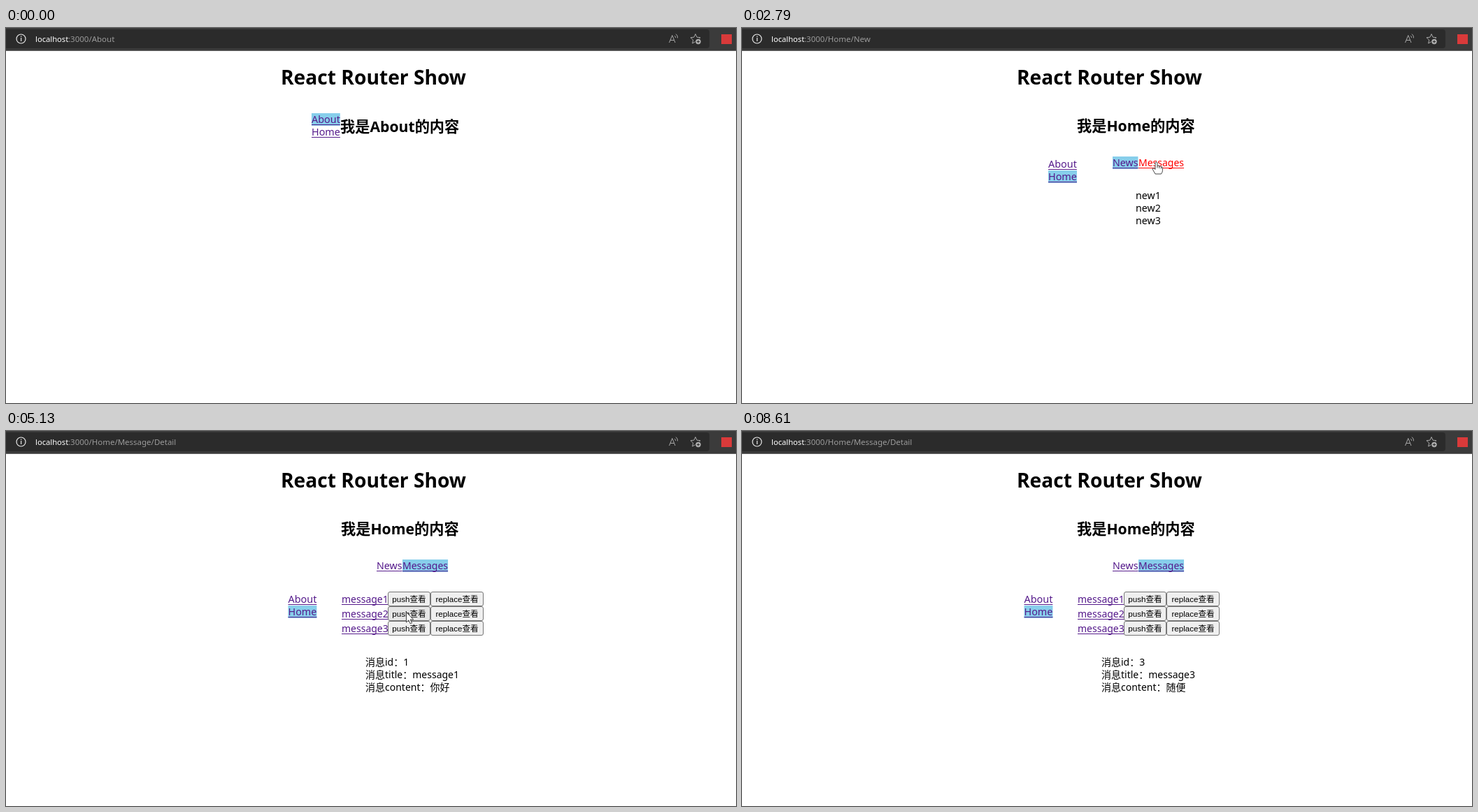
Recreate the animation shown at these times as an HTML page with a canvas. Size 1044x537 px, loop 9.34 s.

```html
<!DOCTYPE html>
<html lang="zh-CN">
<head>
<meta charset="utf-8">
<title>React Router Show</title>
<style>
html, body { margin: 0; width: 100%; height: 100%; overflow: hidden; background: #fff; }
canvas { display: block; }
</style>
</head>
<body>
<canvas id="stage" width="1044" height="537"></canvas>
<script>
const ctx = document.getElementById('stage').getContext('2d');
const LOOP = 9340, STEP = 70;
const SANS = '"Noto Sans", "Noto Sans CJK SC", "Noto Sans CJK", sans-serif';
const ARIAL = '"Liberation Sans", "Noto Sans CJK SC", "Noto Sans CJK", sans-serif';

// Mouse moves: start time, number of steps, end point
const START = [1000, 530];
const MOVES = [
  [250, 11, 490, 138], [1020, 3, 468, 146], [1230, 3, 456, 147],
  [1830, 10, 592, 191], [2930, 9, 545, 237], [3560, 3, 513, 237],
  [4290, 13, 572, 259], [6120, 8, 636, 283], [7000, 11, 680, 356],
  [7770, 13, 986, 545]
];
// Mouse button: press, end of the highlight, release
const CLICKS = [
  [1570, 1630, 1670], [2590, 2720, 2860], [3960, 4090, 4090],
  [5660, 5790, 5790], [6810, 6940, 6940]
];
const URLS = [[0, 'About'], [1710, 'Home/New'], [2860, 'Home/Message'], [4090, 'Home/Message/Detail']];
const DETAILS = [[0, ''], [4090, '你好', 514], [5790, '我不号', 513], [6940, '随便', 514]];

const ARROW = new Path2D('M0 0V14.5L3.3 11.4 5.6 16.4 8 15.4 5.7 10.5H10.2Z');
const HAND = new Path2D('M-1.5 8V1.5Q0-1 1.5 1.5V6Q3.5 4.8 4.3 6.6 6.2 5.6 7 7.4 9 6.8 9 9V12Q9 15 7 17.5H-1.5L-5.5 10.5Q-5 8.6-3 9.6L-1.5 11ZM1.5 6V9M4.3 6.6V9.5M7 7.4V10');

let mouse, pressed, overLink;

const latest = (list, t) => list.filter(item => item[0] <= t).pop();

function mouseAt(t) {
  let [x, y] = START;
  for (const [start, steps, endX, endY] of MOVES) {
    if (t < start) break;
    const p = Math.min(1, (Math.floor((t - start) / STEP) + 1) / steps);
    const e = p * p * (3 - 2 * p);
    x += (endX - x) * e;
    y += (endY - y) * e;
  }
  return { x, y };
}

const mouseIn = (x, y, w, h) =>
  mouse.x >= x && mouse.x < x + w && mouse.y >= y && mouse.y < y + h;

function text(str, x, y, size = 14, color = '#000', weight = 400, family = SANS) {
  ctx.font = `${weight} ${size}px ${family}`;
  ctx.fillStyle = color;
  ctx.fillText(str, x, y);
  return ctx.measureText(str).width;
}

function rect(x, y, w, h, color) {
  ctx.fillStyle = color;
  ctx.fillRect(x, y, w, h);
}

function link(str, x, base, active = false, size = 14) {
  ctx.font = `${size}px ${SANS}`;
  const w = ctx.measureText(str).width;
  const over = mouseIn(x, base - 14, w, 18);
  const color = over && pressed ? '#f00' : '#551a8b';
  overLink ||= over;
  if (active) rect(x, base - 14, w, 18, '#87ceeb');
  rect(x, base + 2, w, 1, color);
  text(str, x, base, size, color);
}

function button(str, x, y, w) {
  const over = mouseIn(x, y, w, 21);
  ctx.beginPath();
  ctx.roundRect(x + .5, y + .5, w - 1, 20, 2.5);
  ctx.fillStyle = !over ? '#efefef' : pressed ? '#f5f5f5' : '#e5e5e5';
  ctx.fill();
  stroke('#767676', 1);
  ctx.textAlign = 'center';
  text(str, x + w / 2, y + 15, 11.6, '#000', 400, ARIAL);
  ctx.textAlign = 'left';
}

function stroke(color, width, path) {
  ctx.strokeStyle = color;
  ctx.lineWidth = width;
  path ? ctx.stroke(path) : ctx.stroke();
}

function arc(x, y, r, from = 0, to = 2 * Math.PI) {
  ctx.beginPath();
  ctx.arc(x, y, r, from, to);
}

function drawBar(path) {
  rect(0, 0, 1044, 33, '#3b3b3b');
  rect(0, 32, 1044, 1, '#666');
  ctx.beginPath();
  ctx.roundRect(-6, 2, 1012, 27, 4);
  ctx.fillStyle = '#2b2b2b';
  ctx.fill();

  arc(21.5, 15.5, 6.5);
  stroke('#e8e8e8', 1.2);
  rect(21, 14, 1.2, 5, '#e8e8e8');
  rect(21, 11.5, 1.2, 1.4, '#e8e8e8');
  text('localhost', 42, 20, 11.2, '#fff');
  text(':3000/' + path, 89, 20, 11.5, '#9a9a9a');

  stroke('#a8a8a8', 1, new Path2D('M948.5 21L952.8 10.5 957 21M950 17.5H955.6'));
  for (const r of [3, 6]) {
    arc(954.5, 13.5, r, -.95, .15);
    stroke('#a8a8a8', 1);
  }

  ctx.beginPath();
  for (let i = 0; i < 10; i++) {
    const a = i * Math.PI / 5 - Math.PI / 2, r = i % 2 ? 3.5 : 7.4;
    ctx.lineTo(986 + r * Math.cos(a), 16 + r * Math.sin(a));
  }
  ctx.closePath();
  stroke('#a8a8a8', 1);
  arc(990, 19.5, 4.4);
  ctx.fillStyle = '#2b2b2b';
  ctx.fill();
  arc(990, 19.5, 3.7);
  ctx.fillStyle = '#b0b0b0';
  ctx.fill();
  stroke('#2b2b2b', 1, new Path2D('M988 19.5h4m-2-2v4'));
  rect(1023, 9, 15, 14, '#d93a3a');
}

function drawNav(x, base, home) {
  link('About', x, base, !home, 14.4);
  link('Home', x, base + 18, home, 14.4);
}

function drawMessages(t) {
  for (let i = 0; i < 3; i++) {
    link('message' + (i + 1), 480, 246 + 21 * i);
    button('push查看', 546, 230 + 21 * i, 61);
    button('replace查看', 607, 230 + 21 * i, 76);
  }
  const detail = latest(DETAILS, t);
  const id = DETAILS.indexOf(detail);
  if (!id) return;
  const [, content, x] = detail;
  ['id：' + id, 'title：message' + id, 'content：' + content]
    .forEach((line, i) => text('消息' + line, x, 336 + 18 * i));
}

function drawPage(t) {
  text('React Router Show', 393, 81, 28.2, '#000', 700);
  if (t < 1670) {
    text('我是About的内容', 478, 149, 21.2, '#000', 700);
    drawNav(437, 136, false);
    return;
  }
  const messages = t >= 2860;
  text('我是Home的内容', 479, 148, 21.2, '#000', 700);
  link('News', 530, 198, !messages, 14.2);
  link('Messages', 567, 198, messages);
  if (messages) {
    drawNav(403.5, t < 4090 ? 205 : 246, true);
    drawMessages(t);
  } else {
    drawNav(438, 200, true);
    for (let i = 0; i < 3; i++) text('new' + (i + 1), 563, 245 + 18 * i, 14.2);
  }
}

function drawMouse(t) {
  if (t < MOVES[0][0]) return;
  if (CLICKS.some(([down, fade]) => t >= down && t < fade)) {
    arc(mouse.x, mouse.y, 10);
    ctx.fillStyle = 'rgba(255, 236, 0, .68)';
    ctx.fill();
  }
  const shape = overLink ? HAND : ARROW;
  ctx.save();
  ctx.translate(Math.round(mouse.x) + .5, Math.round(mouse.y) + .5);
  ctx.fillStyle = '#fff';
  ctx.fill(shape);
  stroke('#333', .9, shape);
  ctx.restore();
}

function draw(now) {
  const t = now % LOOP;
  mouse = mouseAt(t);
  pressed = CLICKS.some(([down, , up]) => t >= down && t < up);
  overLink = false;
  rect(0, 0, 1044, 537, '#fff');
  drawBar(latest(URLS, t)[1]);
  drawPage(t);
  drawMouse(t);
}

const begin = performance.now();
(function tick() {
  draw(performance.now() - begin);
  requestAnimationFrame(tick);
})();
</script>
</body>
</html>
```
